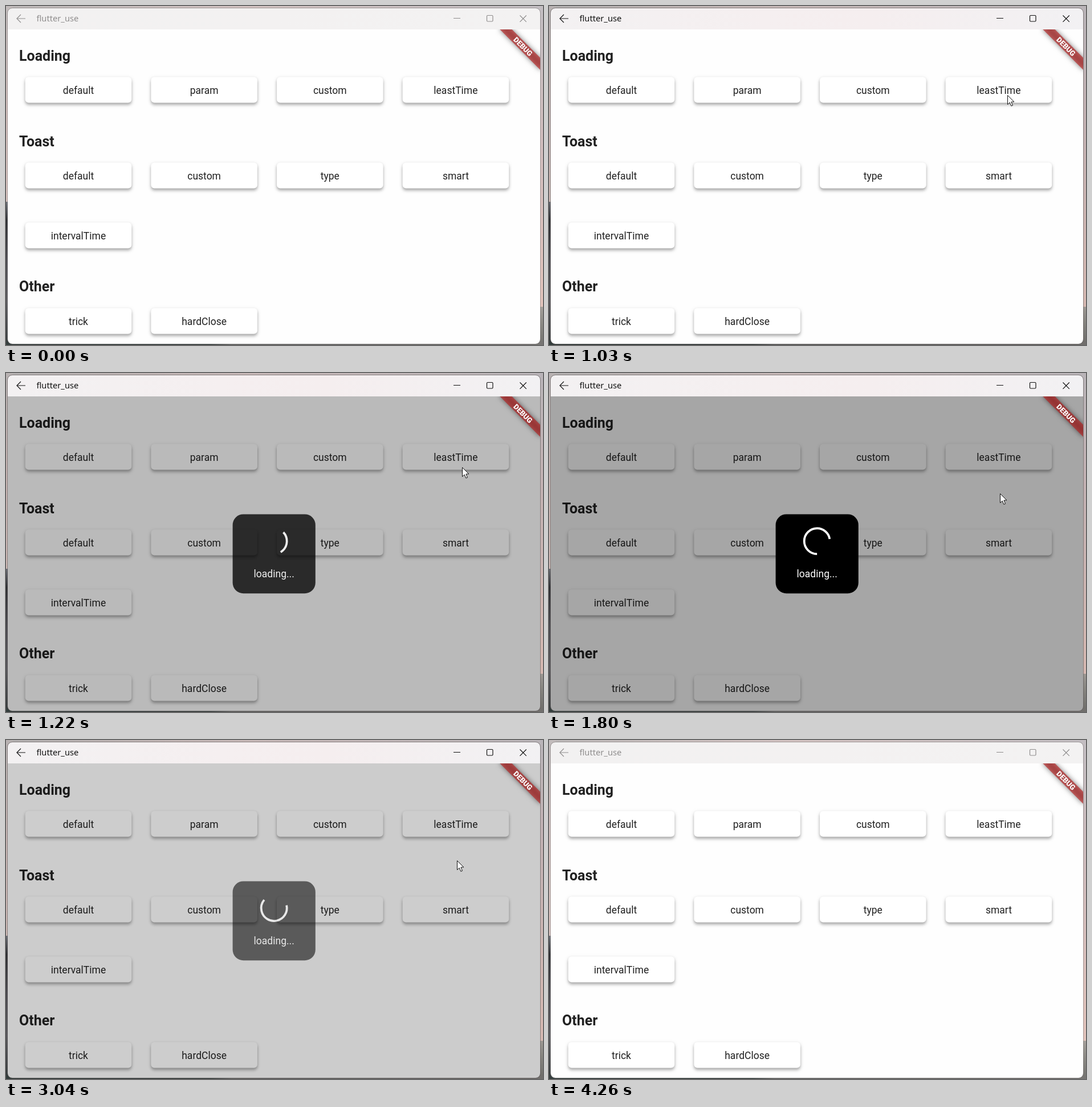
Write an HTML page with a canvas that moves like this. It is 942x594 px and loops after 4290 ms.

```html
<!DOCTYPE html>
<html lang="en">
<head>
<meta charset="utf-8">
<title>flutter_use</title>
<style>
  html, body { margin: 0; width: 100%; height: 100%; overflow: hidden; background: #c9c2c2; }
  canvas { display: block; width: 942px; height: 594px; }
</style>
</head>
<body>
<canvas id="stage" width="942" height="594"></canvas>
<script>
const W = 942, H = 594, LOOP = 4290, TAU = Math.PI * 2;
const WIN = { x: 3, y: 4, w: 934, h: 588, bar: 37 };
const TOP = WIN.y + WIN.bar, RIGHT = WIN.x + WIN.w;
const ROBOTO = 'Roboto, "Open Sans", sans-serif';
const INK = '#212121';
const ctx = document.getElementById('stage').getContext('2d');

const HEADINGS = [['Loading', 95.5], ['Toast', 245.5], ['Other', 500]];
const ROWS = [
  [124.5, ['default', 'param', 'custom', 'leastTime']],
  [274.5, ['default', 'custom', 'type', 'smart']],
  [379.5, ['intervalTime']],
  [529.5, ['trick', 'hardClose']]
];

// [time, x, y] of the pointer tip
const POINTER = [
  [80, 901, 592], [350, 872, 440], [600, 834, 270], [820, 808, 168], [960, 804, 156],
  [1080, 804, 156], [1220, 800, 165], [1400, 794, 196], [1580, 791, 211],
  [3260, 791, 211], [3290, 790, 211], [3420, 804, 250], [3640, 872, 450],
  [3830, 907, 563], [4040, 912, 595]
];
// [time, indicator clock]
const SPIN = [[1065, 0], [1220, 202], [1800, 742], [2690, 1760], [3290, 2400]];
const FADE_IN = [1065, 1267], FADE_OUT = [2935, 3175];
const ACTIVE = [950, 4260];

const clamp = v => Math.min(1, Math.max(0, v));
const ramp = (t, [a, b]) => clamp((t - a) / (b - a));

function sample(keys, t) {
  let i = 1;
  while (i < keys.length - 1 && keys[i][0] < t) i++;
  const a = keys[i - 1], b = keys[i], k = ramp(t, [a[0], b[0]]);
  return a.slice(1).map((v, j) => v + (b[j + 1] - v) * k);
}

// cubic-bezier(.4, 0, .2, 1)
function fastOutSlowIn(x) {
  let lo = 0, hi = 1, u = x;
  for (let i = 0; i < 24; i++) {
    u = (lo + hi) / 2;
    const bx = 1.2 * (1 - u) ** 2 * u + 0.6 * (1 - u) * u * u + u ** 3;
    if (bx < x) lo = u; else hi = u;
  }
  return 3 * (1 - u) * u * u + u ** 3;
}

function gradient(x0, y0, x1, y1, stops) {
  const g = ctx.createLinearGradient(x0, y0, x1, y1);
  stops.forEach(([p, c]) => g.addColorStop(p, c));
  return g;
}

function fillRect(style, x, y, w, h) {
  ctx.fillStyle = style;
  ctx.fillRect(x, y, w, h);
}

function roundRect(x, y, w, h, r) {
  ctx.beginPath();
  ctx.roundRect(x, y, w, h, r);
}

function line(...points) {
  ctx.beginPath();
  points.forEach(([x, y]) => ctx.lineTo(x, y));
  ctx.stroke();
}

function text(str, x, y, font, color, align = 'left') {
  ctx.font = font;
  ctx.fillStyle = color;
  ctx.textAlign = align;
  ctx.fillText(str, x, y);
}

function shadow(color, blur, dy) {
  ctx.shadowColor = color;
  ctx.shadowBlur = blur;
  ctx.shadowOffsetY = dy;
}

function drawDesktop(active) {
  fillRect(gradient(0, 0, W, 0, [[0, '#bdb9b9'], [0.45, '#d3c3c2'], [0.8, '#c9c0c2'], [1, '#c4bfc3']]), 0, 0, W, 8);
  fillRect(gradient(0, 0, 0, 343, [[0, '#c2bcbc'], [0.5, '#d2bfbd'], [1, '#d9c3bf']]), 0, 0, 12, 343);
  fillRect(gradient(0, 343, 0, H, [[0, '#70747c'], [0.13, '#2c2d31'], [0.4, '#4d4c52'], [0.7, '#5d5c61'], [1, '#343a3b']]), 0, 343, 12, H - 343);
  fillRect(gradient(0, 0, 0, 527, [[0, '#c3bec2'], [0.4, '#cfbcbd'], [1, '#e2c3bb']]), 930, 0, 12, 527);
  fillRect(gradient(0, 527, 0, H, [[0, '#a6a19c'], [0.4, '#8e8c87'], [1, '#72716e']]), 930, 527, 12, H - 527);
  fillRect(gradient(0, 0, W, 0, [[0, '#37403f'], [0.38, '#3f4847'], [0.42, '#6a6b6a'], [1, '#777573']]), 0, 588, W, 6);
  if (active) fillRect('rgba(0,0,0,0.05)', 0, 0, W, H);
}

function drawTitleBar(active) {
  const stops = active
    ? [[0, '#f3f1f2'], [0.4, '#f5eff0'], [0.6, '#f5eeef'], [1, '#f2f1f3']]
    : [[0, '#f2f1f1'], [0.5, '#f3f1f1'], [1, '#f3f2f2']];
  fillRect(gradient(WIN.x, 0, RIGHT, 0, stops), WIN.x, WIN.y, WIN.w, WIN.bar);
  const color = active ? '#111' : '#8f8d8d';
  text('flutter_use', 53.5, 27, '14.7px "Noto Sans", "Open Sans", sans-serif', color);
  ctx.strokeStyle = color;
  ctx.lineWidth = 1.2;
  line([34, 22], [19, 22]);
  line([26, 15], [19, 22], [26, 29]);
  line([785, 21.5], [797, 21.5]);
  roundRect(843.5, 16.5, 10.5, 10.5, 1.5);
  ctx.stroke();
  line([901.5, 16.5], [912.8, 27.8]);
  line([912.8, 16.5], [901.5, 27.8]);
}

function drawButton(label, x, y) {
  ctx.save();
  ctx.fillStyle = '#fff';
  roundRect(x, y, 186.5, 45, 6);
  shadow('rgba(0,0,0,0.12)', 5, 1);
  ctx.fill();
  shadow('rgba(0,0,0,0.27)', 5, 4);
  ctx.fill();
  ctx.restore();
  text(label, x + 93.2, y + 29, '17.5px ' + ROBOTO, INK, 'center');
}

function drawPage() {
  fillRect('#fefefe', WIN.x, TOP, WIN.w, H - TOP);
  HEADINGS.forEach(([label, y]) => text(label, 23, y, 'bold 25px ' + ROBOTO, INK));
  ROWS.forEach(([y, labels]) =>
    labels.forEach((label, i) => drawButton(label, 33.75 + i * 220.65, y)));
}

function drawSpinner(ms) {
  const path = (ms % 1333) / 1333;
  const head = fastOutSlowIn(clamp(path * 2));
  const tail = fastOutSlowIn(clamp(path * 2 - 1));
  const start = TAU * (-0.25 + tail * 0.75 + ms / 2222 + path * 0.25);
  const sweep = Math.max((head - tail) * 0.75 * TAU, 0.001);
  ctx.strokeStyle = '#fff';
  ctx.lineWidth = 3.75;
  ctx.beginPath();
  ctx.arc(470.2, 294.6, 22.5, start, start + sweep);
  ctx.stroke();
}

function drawLoading(t) {
  const alpha = ramp(t, FADE_IN) * (1 - ramp(t, FADE_OUT));
  if (!alpha) return;
  ctx.save();
  fillRect(`rgba(0,0,0,${0.35 * alpha})`, WIN.x, TOP, WIN.w, H - TOP);
  ctx.globalAlpha = alpha;
  ctx.fillStyle = '#000';
  roundRect(397.6, 247.4, 145.2, 138.8, 18.75);
  ctx.fill();
  // additive white matches fading the box and its content as one group
  ctx.globalCompositeOperation = 'lighter';
  drawSpinner(sample(SPIN, t)[0]);
  text('loading...', 470.2, 357.5, '17.5px ' + ROBOTO, '#fff', 'center');
  ctx.restore();
}

function drawBanner() {
  ctx.save();
  ctx.beginPath();
  ctx.rect(WIN.x, TOP, WIN.w, H - TOP);
  ctx.clip();
  ctx.translate(RIGHT, TOP);
  ctx.rotate(Math.PI / 4);
  // cast only the blurred shadow from a bar far outside the clip
  ctx.save();
  ctx.shadowColor = 'rgba(0,0,0,0.5)';
  ctx.shadowBlur = 10;
  ctx.shadowOffsetX = 2000;
  const d = 2000 * Math.SQRT1_2;
  fillRect('#000', -50 - d, 35 + d, 100, 15);
  ctx.restore();
  fillRect('rgba(183,28,28,0.627)', -50, 35, 100, 15);
  text('DEBUG', 0, 47, '900 12.75px ' + ROBOTO, '#fff', 'center');
  ctx.restore();
}

function drawPointer(t) {
  if (t < POINTER[0][0] || t > POINTER[POINTER.length - 1][0]) return;
  const [x, y] = sample(POINTER, t);
  ctx.save();
  ctx.translate(Math.round(x) + 0.5, Math.round(y) + 0.5);
  ctx.beginPath();
  [[0, 0], [0, 16], [3.7, 12.6], [6.4, 18.7], [9, 17.6], [6.4, 11.6], [11.4, 11.4]]
    .forEach(p => ctx.lineTo(...p));
  ctx.closePath();
  ctx.fillStyle = '#fff';
  ctx.fill();
  ctx.strokeStyle = '#111';
  ctx.lineWidth = 1;
  ctx.stroke();
  ctx.restore();
}

function draw(t) {
  const active = t >= ACTIVE[0] && t < ACTIVE[1];
  drawDesktop(active);
  ctx.save();
  roundRect(WIN.x, WIN.y, WIN.w, WIN.h, 8);
  ctx.clip();
  drawTitleBar(active);
  drawPage();
  drawLoading(t);
  drawBanner();
  ctx.restore();
  ctx.strokeStyle = active ? 'rgba(90,86,86,0.6)' : 'rgba(110,106,106,0.5)';
  ctx.lineWidth = 1;
  roundRect(WIN.x - 0.5, WIN.y - 0.5, WIN.w + 1, WIN.h + 1, 8.5);
  ctx.stroke();
  drawPointer(t);
}

const begin = performance.now();
function tick() {
  draw((performance.now() - begin) % LOOP);
  requestAnimationFrame(tick);
}
tick();
</script>
</body>
</html>
```
